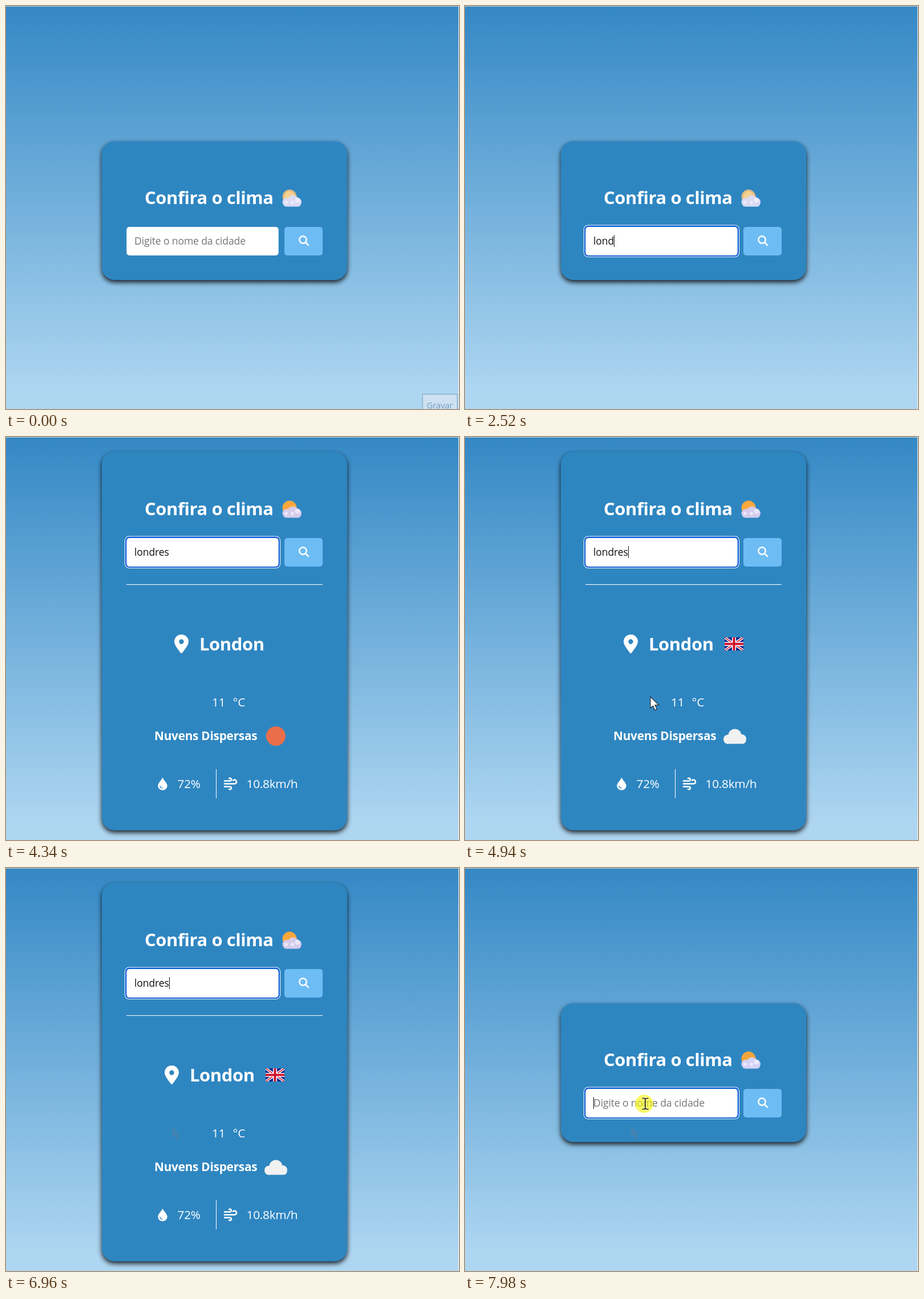
Write an HTML page that moves like this. It is 794 by 706 pixels and loops after 8 s.

```html
<!DOCTYPE html>
<html lang="pt-BR">
<head>
<meta charset="utf-8">
<title>Confira o clima</title>
<style>
  html, body { margin: 0; width: 100%; height: 100%; overflow: hidden; }
  svg { display: block; width: 794px; height: 706px; font-family: "Open Sans", "Noto Sans", sans-serif; }
  text { white-space: pre; }
  .title { font-size: 31px; font-weight: 700; letter-spacing: -.45px; fill: #fff; }
  .field { font-size: 17.6px; letter-spacing: -.16px; }
  .info { font-size: 20.8px; letter-spacing: -.25px; fill: #fff; }
  .shadow { filter: blur(4.5px); }
  .line { fill: none; stroke: #fff; }
</style>
</head>
<body>
<svg viewBox="0 0 794 706">
  <defs>
    <linearGradient id="sky" x2="0" y2="1">
      <stop stop-color="#3488c5"/><stop offset=".96" stop-color="#aed6f1"/>
    </linearGradient>
    <path id="arrow" d="M0 0V20L4.600 15.800L8 23.500L11.300 22L8 14.500H14.500Z"/>
    <clipPath id="flagClip"><rect width="33" height="23"/></clipPath>
  </defs>

  <rect width="794" height="706" fill="url(#sky)"/>
  <path d="M0 .5H794" stroke="#c8d3da"/>
  <path d="M793.500 0V706" stroke="#f4f8fb"/>

  <g id="record">
    <rect x="730" y="680" width="61" height="30" fill="#cde1f2" stroke="#98bad6" stroke-width="2"/>
    <text x="737.500" y="705" font-size="14.600" fill="#709dc1">Gravar</text>
  </g>

  <rect class="shadow card" x="168" width="430" rx="22" fill="#000" opacity=".85" transform="translate(0 4)"/>
  <rect class="card" x="168" width="430" rx="22" fill="#2e86c1"/>

  <g id="search">
    <text class="title" x="243" y="346.500">Confira o clima</text>
    <g id="weather">
      <circle id="sun" cx="497" cy="334" r="11" stroke-width="3" stroke-dasharray="4.300 1.460" stroke-linecap="round"/>
      <g id="cloud">
        <circle cx="492" cy="343.500" r="7.500"/><circle cx="503" cy="341" r="9.500"/>
        <circle cx="510.500" cy="343.500" r="7.500"/><rect x="486" y="341" width="31" height="10.500" rx="5"/>
      </g>
      <g fill="#f3f1fd" opacity=".75">
        <circle cx="511" cy="340" r="4.500"/><circle cx="491" cy="344" r="3"/><circle cx="502" cy="344" r="3"/>
      </g>
    </g>
    <g id="focus">
      <rect x="208" y="383.500" width="273" height="56.500" rx="8" fill="#fff"/>
      <rect x="209" y="384.500" width="271" height="54.500" rx="7" fill="#0b5cd5"/>
    </g>
    <rect x="211.300" y="387" width="266.400" height="50" rx="5" fill="#fff"/>
    <text id="typed" class="field" x="225" y="418"/>
    <path id="caret" d="M.5 401V422" stroke="#111"/>
    <rect x="488" y="387" width="67" height="50" rx="5" fill="#6dbcf4"/>
    <g class="line" stroke-width="2.500">
      <circle cx="520.500" cy="409.500" r="6.200"/><path d="M525 414L530 419" stroke-linecap="round"/>
    </g>
  </g>

  <g id="result">
    <path class="line" d="M211 258.500H555"/>
    <g id="place">
      <path fill="#fff" fill-rule="evenodd" d="M290.500 346C283.500 346 278 351.500 278 358.500C278 364 285 373 289 378Q290.500 380 292 378C296 373 303 364 303 358.500C303 351.500 297.500 346 290.500 346ZM290.500 354.300A4.200 4.200 0 1 1 290.490 354.300Z"/>
      <text class="title" x="322" y="374">London</text>
    </g>
    <g id="flag" transform="translate(455 351)" clip-path="url(#flagClip)">
      <rect width="33" height="23" fill="#10278a"/>
      <path d="M0 0L33 23M33 0L0 23" stroke="#fff" stroke-width="4.600"/>
      <path d="M0 0L33 23M33 0L0 23" stroke="#d0142c" stroke-width="1.500"/>
      <path d="M16.500 0V23M0 11.500H33" stroke="#fff" stroke-width="7"/>
      <path d="M16.500 0V23M0 11.500H33" stroke="#d0142c" stroke-width="4"/>
    </g>
    <text class="info" x="361" y="472">11</text>
    <text class="info" x="397.500" y="472">°C</text>
    <text class="info" x="260" y="531" font-weight="700">Nuvens Dispersas</text>
    <circle id="clearSky" cx="473" cy="524" r="17" fill="#eb6e4b"/>
    <g id="cloudy" fill="#f1f1f1">
      <circle cx="473" cy="523" r="11.500"/><circle cx="461" cy="529.500" r="8"/>
      <circle cx="485" cy="529" r="8"/><rect x="454" y="526" width="38.500" height="11.500" rx="5.700"/>
    </g>
    <path fill="#fff" d="M274.500 596.500C272 602 266.300 606 266.300 611A8.200 7.700 0 0 0 282.700 611C282.700 606 277 602 274.500 596.500Z"/>
    <path class="line" d="M270 611Q270.500 615 274.500 615.500" style="stroke:#2e86c1" stroke-width="1.500"/>
    <text class="info" x="300.500" y="615">72%</text>
    <path class="line" d="M368.500 582V633"/>
    <path class="line" stroke-width="2.600" stroke-linecap="round" d="M383 602.500H393A2.500 2.500 0 1 0 391 598M383 607.500H400.500A3.500 3.500 0 1 0 398 601.500M383 612.500H393A2.500 2.500 0 1 1 391 617"/>
    <text class="info" x="421.500" y="615">10.8km/h</text>
  </g>

  <use id="trace" href="#arrow" x="291" y="453" fill="#6f7f8e" opacity=".3"/>
  <circle id="click" cx="314" cy="413" r="16" fill="#f5f500" opacity=".6"/>
  <g id="pointer">
    <use id="hand" href="#arrow" fill="#fff" stroke="#222" stroke-width="1.100"/>
    <g id="beam" fill="none">
      <path d="M-5-10H-2L0-8L2-10H5M0-8V8M-5 10H-2L0 8L2 10H5" stroke="#fff" stroke-width="3" opacity=".5"/>
      <path d="M-5.500-9.500H-2L0-8.500L2-9.500H5.500M0-8.500V8.500M-5.500 9.500H-2L0 8.500L2 9.500H5.500" stroke="#1c1c1c" stroke-width="1.600"/>
    </g>
  </g>
</svg>
<script>
const LOOP = 8000, OPENED = 4340, RELOADED = 7180;
const el = Object.fromEntries([...document.querySelectorAll('[id]')].map(e => [e.id, e]));
const cards = document.querySelectorAll('.card');

// [time, value...]: each value holds until the next entry
const typing = [[0, 0], [1810, 1], [2010, 2], [2220, 3], [2520, 4], [2720, 5], [2820, 6], [3030, 7], [RELOADED, 0]];
const blinks = [[0, 0], [910, 1], [1610, 0], [1810, 1], [3230, 0], [3750, 1], [OPENED, 0], [4840, 1],
  [5340, 0], [5860, 1], [6460, 0], [6960, 1], [RELOADED, 0], [7980, 1]];
const moves = [[0], [290, 611, 596], [390, 510, 540], [500, 410, 478], [600, 356, 439], [710, 325, 420],
  [910, 317, 412], [1810], [4840, 366, 457], [4940, 325, 455], [5040, 291, 453], [5340]];

const between = (t, a, b) => t >= a && t < b;
const at = (track, t) => track.findLast(k => k[0] <= t).slice(1);
const show = (node, on) => node.setAttribute('display', on ? 'inline' : 'none');

function pointerAt(t) {
  if (t < RELOADED) return at(moves, t);
  const p = Math.min(Math.floor((t - RELOADED) / 100) / 6, 1);
  const eased = p * p * (3 - 2 * p);
  return [160 + 156 * eased, 228 + 185 * eased];
}

function drawPointer(t) {
  const [x, y] = pointerAt(t);
  show(el.pointer, x !== undefined);
  if (x === undefined) return;
  const overField = between(x, 211, 478) && between(y, 387, 437);
  el.pointer.setAttribute('transform', `translate(${x} ${y})`);
  show(el.beam, overField);
  show(el.hand, !overField);
}

function drawField(t) {
  const count = at(typing, t)[0];
  const content = count ? 'londres'.slice(0, count) : 'Digite o nome da cidade';
  if (el.typed.textContent !== content) el.typed.textContent = content;
  el.typed.setAttribute('fill', count ? '#111' : '#757575');
  const caretX = 225 + (count ? Math.round(el.typed.getComputedTextLength()) : 0);
  el.caret.setAttribute('transform', `translate(${caretX} 0)`);
  show(el.caret, at(blinks, t)[0]);
  show(el.focus, between(t, 910, RELOADED) || t >= 7980);
}

function render(t) {
  const opened = between(t, OPENED, RELOADED);
  const flagged = t >= 4540;
  for (const card of cards) {
    card.setAttribute('y', opened ? 26 : 237);
    card.setAttribute('height', opened ? 663 : 243);
  }
  el.search.setAttribute('transform', `translate(0 ${opened ? -210 : 0})`);
  const [sun, rim, cloud] = t < OPENED ? ['#f5d18f', '#dfb783', '#dadbf4']
    : opened ? ['#fca83d', '#fca83d', '#d5ccec'] : ['#f2a63a', '#f2a63a', '#d3d2f7'];
  el.sun.setAttribute('fill', sun);
  el.sun.setAttribute('stroke', rim);
  el.cloud.setAttribute('fill', cloud);

  show(el.record, t < 100);
  show(el.result, opened);
  show(el.flag, flagged);
  el.place.setAttribute('transform', `translate(${flagged ? 0 : 17} 0)`);
  show(el.clearSky, t < 4440);
  show(el.cloudy, t >= 4440);
  show(el.trace, t >= 5340);
  show(el.click, between(t, 910, 1120) || t >= 7980);
  drawField(t);
  drawPointer(t);
}

const start = performance.now();
function tick() {
  render((performance.now() - start) % LOOP);
  requestAnimationFrame(tick);
}
tick();
</script>
</body>
</html>
```
